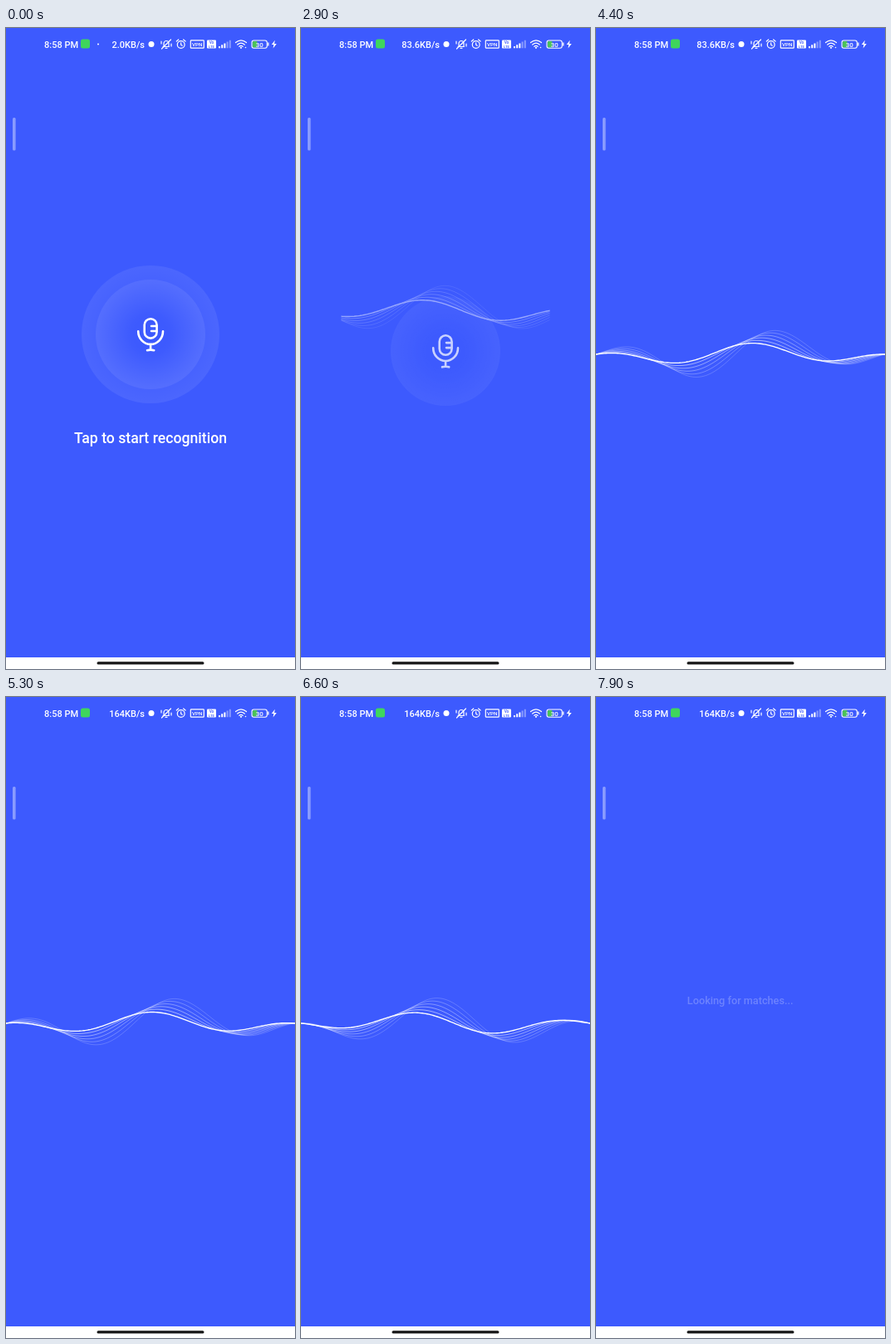
Animation, 348 px wide and 772 px high, one loop 8000 ms. Source, as an HTML page:

```html
<!DOCTYPE html>
<html lang="en">
<head>
<meta charset="utf-8">
<title>Voice recognition</title>
<style>
  html, body { margin: 0; width: 100%; height: 100%; overflow: hidden; background: #3d5afe; }
  svg { display: block; width: 348px; height: 772px; }
  text { font: 500 11px Roboto, sans-serif; fill: #fff; }
  .line { fill: none; stroke: #fff; stroke-linecap: round; stroke-linejoin: round; }
</style>
</head>
<body>
<svg viewBox="0 0 348 772">
  <defs>
    <radialGradient id="glow">
      <stop offset=".3" stop-color="#fff" stop-opacity="0"/>
      <stop offset="1" stop-color="#fff" stop-opacity=".075"/>
    </radialGradient>
    <clipPath id="clip"><rect id="window" y="250" height="250"/></clipPath>
  </defs>
  <rect width="348" height="772" fill="#3d5afe"/>

  <!-- status bar -->
  <text x="46" y="23.5">8:58 PM</text>
  <rect x="90" y="13.5" width="11" height="11" rx="2.5" fill="#3fd65c"/>
  <circle id="dot" cx="111" cy="19.5" r="1" fill="#fff"/>
  <text id="speed" x="167" y="23.5" text-anchor="end"></text>
  <circle cx="175" cy="19.5" r="3.5" fill="#fff"/>
  <g class="line" stroke-width="1.2">
    <path d="M189 22.5h7.5M190 22v-3.5a3 3 0 0 1 6 0V22M192 24.3h2M187.5 25L198.5 14M187 16v3M199 19v3"/>
    <circle cx="210.7" cy="20" r="4.4"/>
    <path d="M210.7 17.8v2.4l1.6 1M205.3 16l2.4-2M213.7 14l2.4 2"/>
    <rect x="222.3" y="14.8" width="16" height="9.4" rx=".8"/>
    <path d="M276.5 17.5q6.5-5.4 13 0M278.7 20q4.3-3.6 8.6 0M280.9 22.3q2.1-1.7 4.2 0"/>
  </g>
  <text x="230.3" y="21.8" text-anchor="middle" style="font-size:6.2px">VPN</text>
  <rect x="242" y="14.5" width="11" height="10" rx="1" fill="#fff"/>
  <g text-anchor="middle">
    <text x="247.5" y="19.3" style="font-size:4.8px;fill:#3d5afe">Vo</text>
    <text x="247.5" y="23.8" style="font-size:4.3px;fill:#3d5afe">LTE</text>
  </g>
  <g fill="#fff">
    <path d="M256 22h2v2.3h-2zM259.2 20.3h2v4h-2zM262.4 18.5h2v5.8h-2z"/>
    <path d="M265.6 16.6h2v7.7h-2zM268.8 14.8h2v9.5h-2z" opacity=".4"/>
    <circle cx="283" cy="23.8" r="1.1"/>
    <circle cx="288.5" cy="23.5" r=".8"/>
    <path d="M315.2 17.5h1.3v4h-1.3zM323.8 14.8l-4 5.2h2.6l-.8 4.4 4.2-5.4h-2.7z"/>
  </g>
  <rect x="297" y="16" width="5.5" height="7.4" rx="1" fill="#4bc258"/>
  <rect class="line" x="296" y="15" width="18.3" height="9.2" rx="2.4" stroke-width="1.1"/>
  <text x="305.2" y="22.5" text-anchor="middle" style="font-size:8px">30</text>

  <!-- edge handle and home bar -->
  <rect x="8" y="108" width="3.6" height="39.5" rx="1.5" fill="#fff" opacity=".4"/>
  <rect y="758" width="348" height="14" fill="#fff"/>
  <rect x="109.5" y="763.2" width="129" height="3.4" rx="1.7" fill="#151515"/>

  <g id="mic">
    <circle id="ring" cx="174" cy="369" fill="url(#glow)"/>
    <circle id="base" cx="174" cy="369" fill="url(#glow)"/>
    <g class="line" stroke-width="2.6">
      <rect x="166.7" y="350.2" width="14.9" height="23.4" rx="7.4"/>
      <path d="M175 359h6M175 365h6M159.2 365.3a14.9 15.6 0 0 0 29.8 0M174.1 381v6.5M170 388.2q4.1-1.2 8.2 0"/>
    </g>
  </g>
  <text id="tap" x="174" y="499.5" text-anchor="middle" style="font-size:17.65px">Tap to start recognition</text>
  <g clip-path="url(#clip)"><g id="wave" class="line"></g></g>
  <text id="looking" x="173.7" y="369.5" text-anchor="middle" style="font-size:12.7px">Looking for matches...</text>
</svg>
<script>
const $ = id => document.getElementById(id);
const set = (node, attrs) => { for (const k in attrs) node.setAttribute(k, attrs[k]); };
const ramp = (t, from, to) => Math.min(1, Math.max(0, (t - from) / (to - from)));
const ease = p => p * p * (3 - 2 * p);

const LOOP = 8000, WIDTH = 348, MID = WIDTH / 2, WAVELENGTH = 203.5, SPEED = 0.4372;
const lines = Array.from({ length: 6 }, (_, i) => {
  const path = document.createElementNS("http://www.w3.org/2000/svg", "path");
  set(path, { "stroke-width": i ? 0.75 : 1.35, opacity: i ? 0.8 - i * 0.11 : 1 });
  return $("wave").appendChild(path);
});

// Sine under a parabolic envelope; each fainter line is taller and trails behind
function wavePath(i, t) {
  const height = 13.5 + 3.4 * i;
  const crest = 189 + SPEED * (t - 4400) + 5.8 * i;
  let d = "";
  for (let x = 0; x <= WIDTH; x += 2) {
    const u = (x - MID) / MID;
    const y = 393 - height * (1 - u * u) * Math.cos(2 * Math.PI * (x - crest) / WAVELENGTH);
    d += (x ? "L" : "M") + x + " " + y.toFixed(2);
  }
  return d;
}

function draw(t) {
  $("speed").textContent = t < 500 ? "2.0KB/s" : t < 4700 ? "83.6KB/s" : "164KB/s";
  set($("dot"), { opacity: t < 500 ? 1 : 0 });

  const pulse = t < 800 ? 1 - ease(t / 800) : ease(ramp(t, 1500, 2000));
  const swap = ease(ramp(t, 2700, 3120));
  set($("ring"), { r: 71 + 12 * pulse, opacity: 1 - ramp(t, 2680, 2850) });
  set($("base"), { r: 71 - 5 * pulse });
  set($("mic"), { transform: `translate(0 ${43 * swap})`, opacity: 1 - swap ** 1.7 });
  set($("tap"), { opacity: 1 - ramp(t, 2650, 2800) });

  set($("window"), { x: 91 * (1 - swap), width: 166 + 182 * swap });
  set($("wave"), {
    transform: `translate(0 ${-98 * (1 - swap)})`,
    opacity: swap * (1 - ramp(t, 7650, 7850))
  });
  lines.forEach((path, i) => set(path, { d: wavePath(i, t) }));

  set($("looking"), { opacity: 0.24 * ramp(t, 7800, 7900) + 0.2 * ramp(t, 7900, 8000) });
}

function frame() {
  draw(performance.now() % LOOP);
  requestAnimationFrame(frame);
}
frame();
</script>
</body>
</html>
```
